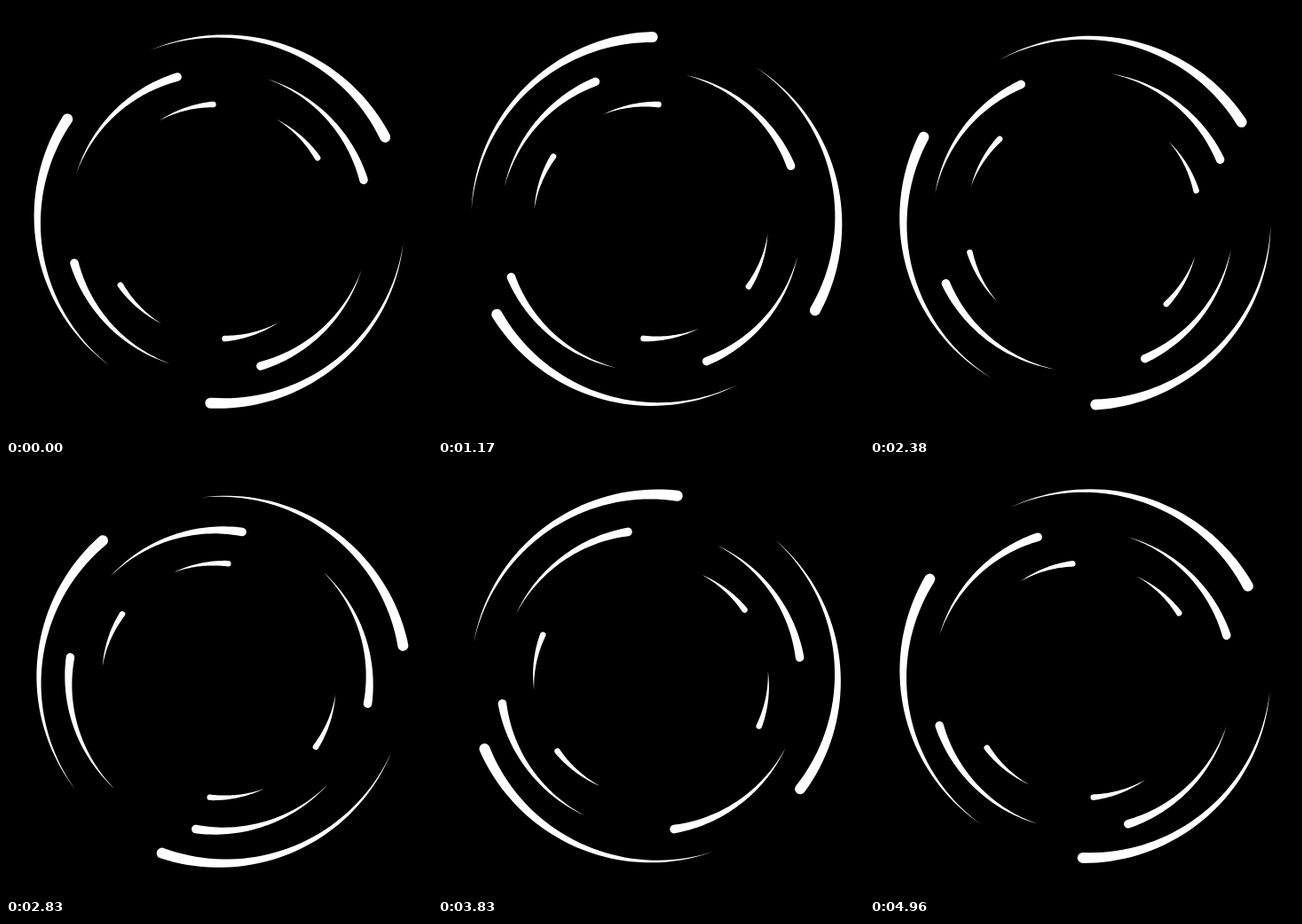
An HTML page that plays this animation: 480x486 px, repeating every 5000 ms.

```html
<!DOCTYPE html>
<html lang="en">
<head>
<meta charset="utf-8">
<title>Orbiting arcs</title>
<style>
  html, body { margin: 0; width: 100%; height: 100%; overflow: hidden; background: #000; }
  svg { display: block; width: 480px; height: 486px; fill: #fff; }
</style>
</head>
<body>
<svg viewBox="0 0 480 486"></svg>
<script>
const LOOP = 5000, FPS = 24;
const svg = document.querySelector('svg');

// Angles in degrees, clockwise; start and speed describe the heads, speed is per step.
const rings = [
  { r: 207, half: 6, span: 86, heads: [0, 120, 240], start: 93.3, speed: 2, drift: true },
  { r: 169.6, half: 4.8, span: 55, heads: [0, 90, 180, 270], start: 73.95, speed: 3.0134 },
  { r: 132.2, half: 3.3, span: 27.5, heads: [0, 60, 180, 240], start: 87.15, speed: 4.519 }
];

// Slow wander of the outer ring's centre: step, x, y.
const wander = [
  [0, 242.3, 241], [17, 243.7, 241.3], [28, 244.3, 242], [46, 244.8, 242.4],
  [58, 244.4, 242.8], [68, 244, 242.2], [92, 243.4, 240], [119, 244.3, 236]
];

function polar(r, deg) {
  const a = deg * Math.PI / 180;
  return (r * Math.cos(a)).toFixed(2) + ' ' + (r * Math.sin(a)).toFixed(2);
}

// An arc that tapers from a round head back to a point.
function taper({ r, half, span }, head) {
  const outer = [], inner = [], parts = 40;
  for (let i = 0; i <= parts; i++) {
    const k = i / parts, deg = head - span * (1 - k);
    outer.push(polar(r + half * k, deg));
    inner.unshift(polar(r - half * k, deg));
  }
  return `M${outer.join('L')}A${half} ${half} 0 0 1 ${inner.join('L')}Z`;
}

for (const ring of rings) {
  ring.path = document.createElementNS('http://www.w3.org/2000/svg', 'path');
  ring.path.setAttribute('d', ring.heads.map(h => taper(ring, h)).join(''));
  svg.append(ring.path);
}

function centreAt(step) {
  const i = Math.max(1, wander.findIndex(p => p[0] >= step));
  const [a, ax, ay] = wander[i - 1], [b, bx, by] = wander[i];
  const k = (step - a) / (b - a);
  return [ax + (bx - ax) * k, ay + (by - ay) * k];
}

// Steps start on whole hundredths of a second.
function stepAt(ms) {
  const n = Math.floor((ms + 5) * FPS / 1000);
  const late = Math.round(n * 100 / FPS) * 10 > ms;
  return Math.min(late ? n - 1 : n, LOOP * FPS / 1000 - 1);
}

function draw(ms) {
  const step = stepAt(ms % LOOP);
  for (const ring of rings) {
    const [x, y] = ring.drift ? centreAt(step) : [240, 243];
    const turn = ring.start + ring.speed * step;
    ring.path.setAttribute('transform', `translate(${x} ${y}) rotate(${turn})`);
  }
}

const begin = performance.now();
function tick() {
  draw(performance.now() - begin);
  requestAnimationFrame(tick);
}
tick();
</script>
</body>
</html>
```
